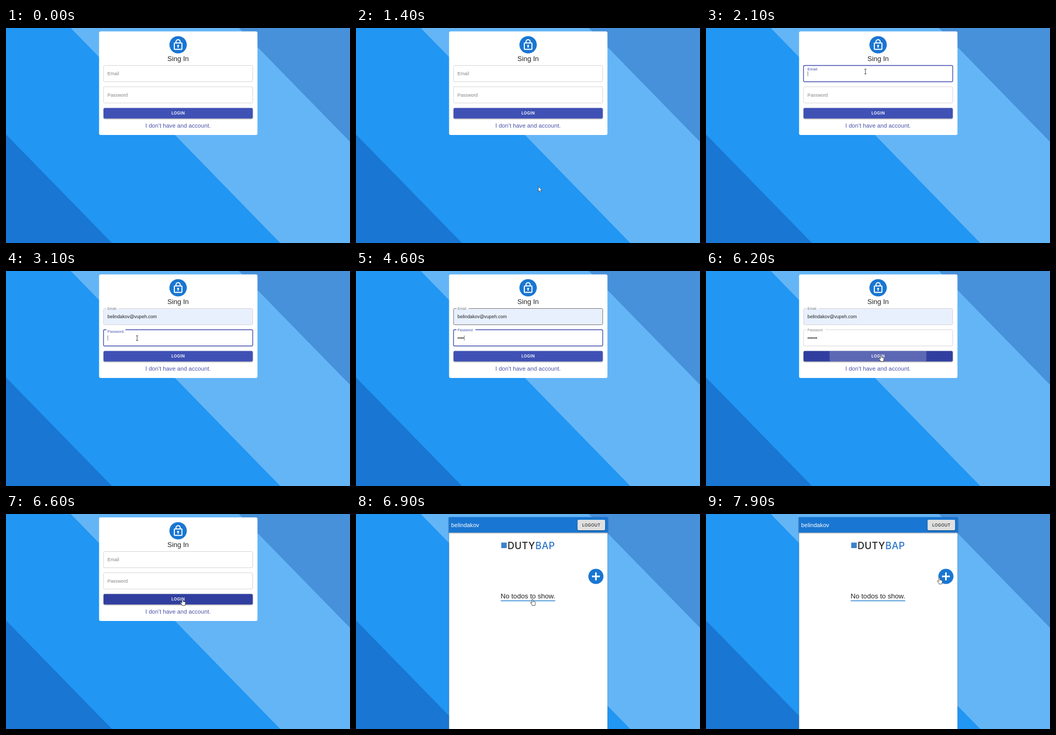
An HTML page for the animation above (8000 ms loop, 656 px wide and 410 px high).

```html
<!DOCTYPE html>
<html lang="en">
<head>
<meta charset="utf-8">
<title>Sign in</title>
<style>
  html, body { margin: 0; width: 100%; height: 100%; overflow: hidden; }
  svg { display: block; width: 100vw; height: 100vh; }
  text { font-family: "Liberation Sans", Arial, sans-serif; white-space: pre; }
  .mid { text-anchor: middle; }
  .geo { font-family: Inter, "Open Sans", sans-serif; font-size: 7.7px; }
  .heading { font-size: 13.1px; fill: #222; }
  .body { font-size: 8.8px; fill: #222; }
  .sub { font-size: 11px; letter-spacing: .0075em; }
  .raised { filter: drop-shadow(0 1px 1px rgba(0, 0, 0, .4)); }
  .border { fill: none; }
  .caret { stroke: #555; stroke-width: .8; }
</style>
</head>
<body>
<svg viewBox="0 0 656 410" preserveAspectRatio="none">
  <defs><clipPath id="buttonClip"><rect x="186" y="152.5" width="284.5" height="20" rx="2.2"/></clipPath></defs>

  <rect width="656" height="410" fill="#2196f3"/>
  <path d="M0 203L202 410H0Z" fill="#1976d2"/>
  <path d="M123.500 0H656V410H523Z" fill="#64b5f6"/>
  <path d="M444 0H656V217Z" fill="#4790da"/>

  <g id="login">
    <rect x="177.500" y="6.500" width="302" height="197.500" rx="3" fill="#fff"/>
    <circle cx="328.200" cy="32" r="16.600" fill="#1976d2"/>
    <g fill="none" stroke="#fff" stroke-width="2">
      <rect x="321" y="28.500" width="14.500" height="12.300" rx="1"/>
      <path d="M324.200 28V26.200a4 4 0 0 1 8 0V28"/>
      <path d="M328.200 34V38" stroke-width="1.500"/>
    </g>
    <circle cx="328.200" cy="33.800" r="1.900" fill="#fff"/>
    <text class="heading mid" x="328.200" y="62.500">Sing In</text>
    <g id="fields"></g>
    <rect id="button" class="raised" x="186" y="152.500" width="284.500" height="20" rx="2.200"/>
    <circle id="ripple" cx="328" cy="160" fill="#fff" clip-path="url(#buttonClip)"/>
    <text class="geo mid" x="328.300" y="165.200" fill="#fff" font-weight="600" letter-spacing=".4">LOGIN</text>
    <text class="sub mid" x="328.200" y="190" fill="#4a50a6">I don't have and account.</text>
  </g>

  <g id="todos">
    <rect class="raised" x="177.500" y="6" width="302" height="420" fill="#fff"/>
    <rect class="raised" x="177" y="6" width="303" height="29.500" fill="#1976d2"/>
    <text class="sub" x="181.500" y="24.700" fill="#fff">belindakov</text>
    <rect class="raised" x="422.500" y="11" width="52.500" height="20" rx="2.200" fill="#e0e0e0"/>
    <text class="geo mid" x="448.900" y="23.700" fill="#222" font-weight="500" letter-spacing=".4">LOGOUT</text>
    <rect x="277" y="54.500" width="10.500" height="10.500" fill="#3b82cc"/>
    <text class="geo" x="289" y="66.800" fill="#222" font-weight="500" style="font-size:18px" letter-spacing=".5">DUTY<tspan fill="#2a74c9">BAP</tspan></text>
    <circle cx="457.500" cy="119" r="14.400" fill="#1976d2"/>
    <path d="M450 119H465M457.500 111.500V126.500" stroke="#fff" stroke-width="3"/>
    <text class="heading mid" x="327.900" y="160.600">No todos to show.</text>
    <path d="M276 165.500H380" stroke="#2a82d2" stroke-width="1.300"/>
  </g>

  <g id="cursor" stroke="#333" stroke-linejoin="round">
    <path id="arrow" fill="#fff" stroke-width=".700" d="M0 0V9.500L2.200 7.600 3.700 11 5.200 10.300 3.800 7.100H6.800Z"/>
    <path id="beam" fill="none" stroke-width=".900" d="M-2-4.500H2M0-4.500V4.500M-2 4.500H2"/>
    <path id="hand" fill="#fff" stroke-width=".800" d="M-1 .8Q-1-.3 0-.3 1.100-.3 1.100.8V4.200L4.600 5Q6 5.300 5.800 7L5 10V12H-.8L-1 10.500-3.800 6.800Q-4 5.500-2.600 5.800L-1 7.200Z"/>
  </g>
</svg>
<script>
const LOOP = 8000, STEP = 100;
const FOCUS_EMAIL = 2047, FILL = 2650, FOCUS_PASSWORD = 3010;
const CLICK = 6050, CLEAR = 6250, LOGGED_IN = 6900;
const KEYS = [3900, 4100, 4300, 4600, 4900, 5100];
const PATH = [
  [900, 357, 398], [1000, 356, 338], [1100, 356, 338], [1200, 356, 343],
  [2000, 304, 83], [2100, 304, 83], [2500, 282, 112], [2900, 250, 128],
  [3100, 250, 128], [3200, 244, 72], [3300, 237, 88], [5400, 237, 88],
  [5900, 324.5, 154.5], [6300, 336.5, 162.5], [7200, 336.5, 162.5], [7900, 445, 121.5]
];

const $ = id => document.getElementById(id);
const clamp = v => Math.max(0, Math.min(1, v));
const mix = (a, b, p) => a + (b - a) * p;
const show = (el, on) => el.style.display = on ? "" : "none";
const set = (el, attrs) => { for (const k in attrs) el.setAttribute(k, attrs[k]); };

function add(parent, tag, attrs) {
  const el = document.createElementNS("http://www.w3.org/2000/svg", tag);
  set(el, attrs);
  return parent.appendChild(el);
}

function makeField(name, top, labelWidth) {
  const g = add($("fields"), "g", {});
  const fill = add(g, "rect", { x: 186, y: top, width: 284.5, height: 31, rx: 2.2 });
  const border = add(g, "path", { class: "border" });
  const label = add(g, "text", { x: 193.6 });
  label.textContent = name;
  const value = add(g, "text", { class: "body", x: 193.6, y: top + 18.6 });
  const caret = add(g, "path", { class: "caret" });
  return { top, labelWidth, fill, border, label, value, caret };
}
const email = makeField("Email", 71.5, 16.5);
const password = makeField("Password", 112, 29);

// Material "ease out": cubic-bezier(0, 0, .2, 1)
function easeOut(x) {
  let lo = 0, hi = 1;
  for (let i = 0; i < 20; i++) {
    const s = (lo + hi) / 2;
    if (.6 * s * s + .4 * s ** 3 < x) lo = s; else hi = s;
  }
  return 3 * lo * lo - 2 * lo ** 3;
}

function pointer(t) {
  const i = PATH.findIndex(k => k[0] > t);
  if (i < 0) return PATH[PATH.length - 1].slice(1);
  if (i === 0) return [-99, -99];
  const [t0, x0, y0] = PATH[i - 1], [t1, x1, y1] = PATH[i];
  let p = (t - t0) / (t1 - t0);
  if (t1 - t0 > 600) p = p * p * (3 - 2 * p);
  return [mix(x0, x1, p), mix(y0, y1, p)];
}

const inRow = ([x, y], top, height) => x > 186 && x < 470.5 && y >= top && y <= top + height;
const overButton = at => inRow(at, 152.5, 20);
const overLink = ([x, y]) => x > 266 && x < 390 && y > 179 && y < 194;

// Share of the last 250 ms spent over the button gives its colour fade
function buttonHover(t) {
  let n = 0;
  for (let i = 0; i < 10; i++) n += overButton(pointer(t - i * 25));
  return n / 10;
}

function drawField(f, t, at, s) {
  const raised = clamp((t - s.focusAt) / 200), lowered = clamp((t - CLEAR) / 200);
  const p = easeOut(raised) * (1 - easeOut(lowered));
  const focused = t >= s.focusAt && t < s.blurAt;
  const notched = t > s.focusAt + 60 && t < CLEAR + 50;
  const hovered = !focused && inRow(at, f.top, 31);
  const { top } = f, bottom = top + 31;
  const start = notched ? 193.6 + f.labelWidth + 5 : 191.5;
  set(f.border, {
    d: `M${start} ${top}H468.3q2.2 0 2.2 2.2V${bottom - 2.2}q0 2.2-2.2 2.2H188.2q-2.2 0-2.2-2.2V${top + 2.2}q0-2.2 2.2-2.2H191.5`,
    stroke: focused ? "#3f4cae" : hovered ? "#666" : "#d3cecf",
    "stroke-width": focused ? 1.4 : .9
  });
  set(f.label, {
    y: mix(top + 18.7, top + 2.6, p),
    "font-size": mix(8.8, 6.6, p),
    fill: focused ? "#4a55ae" : "#858585"
  });
  f.fill.setAttribute("fill", s.tinted ? "#e8f0fe" : "#fff");
  f.value.textContent = s.text;
  const x = 194.2 + s.textWidth;
  f.caret.setAttribute("d", `M${x} ${top + 11}V${top + 20.500}`);
  show(f.caret, focused && (t - s.typedAt) % 1000 < 500);
}

function render(t) {
  const at = pointer(t), [x, y] = at;
  const loggedIn = t >= LOGGED_IN;
  show($("login"), !loggedIn);
  show($("todos"), loggedIn);

  const filled = t >= FILL && t < CLEAR;
  drawField(email, t, at, {
    focusAt: FOCUS_EMAIL, blurAt: FOCUS_PASSWORD, tinted: filled,
    text: filled ? "belindakov@vupeh.com" : "",
    textWidth: filled ? 95 : 0, typedAt: filled ? FILL : FOCUS_EMAIL
  });
  const typed = KEYS.filter(k => k <= t);
  const count = t < CLEAR ? typed.length : 0;
  drawField(password, t, at, {
    focusAt: FOCUS_PASSWORD, blurAt: CLICK, tinted: false,
    text: "•".repeat(count), textWidth: count * 3.08,
    typedAt: typed.length ? typed[typed.length - 1] : FOCUS_PASSWORD
  });

  const h = buttonHover(t);
  $("button").setAttribute("fill", `rgb(${mix(63, 48, h)},${mix(81, 63, h)},${mix(181, 159, h)})`);
  const r = clamp((t - CLICK) / 540);
  set($("ripple"), { r: 150 * easeOut(r), opacity: r > 0 ? .3 * (1 - r) : 0 });

  const overField = !loggedIn && (inRow(at, 71.5, 31) || inRow(at, 112, 31));
  const overAdd = Math.hypot(x - 457.5, y - 119) < 14.4;
  const overHand = loggedIn ? t < 7300 || overAdd : overButton(at) || overLink(at);
  show($("beam"), overField);
  show($("hand"), overHand);
  show($("arrow"), !overField && !overHand);
  show($("cursor"), t >= 900 && (t < 3600 || t >= 5500));
  $("cursor").setAttribute("transform", `translate(${x} ${y})`);
}

const began = performance.now();
function tick() {
  const t = (performance.now() - began) % LOOP;
  render(Math.floor(t / STEP) * STEP);
  requestAnimationFrame(tick);
}
tick();
</script>
</body>
</html>
```
